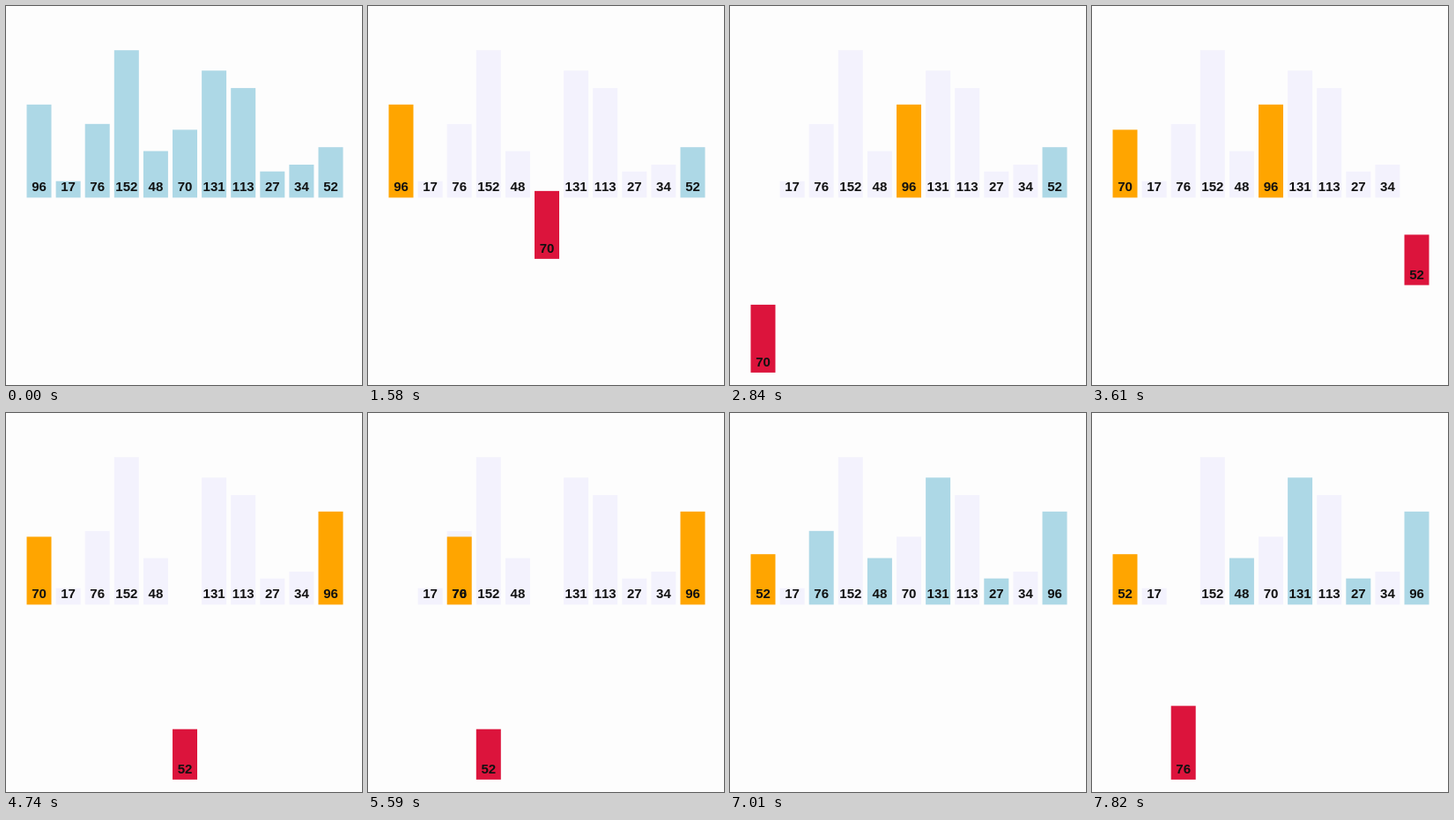
An HTML page with a canvas that plays this animation: 404x430 px, repeating every 8 s.

```html
<!DOCTYPE html>
<html lang="en">
<head>
<meta charset="utf-8">
<title>Shell sort</title>
<style>
  html, body { margin: 0; width: 100%; height: 100%; overflow: hidden; background: #fdfdfd; }
  canvas { display: block; width: 404px; height: 430px; }
</style>
</head>
<body>
<canvas id="stage" width="404" height="430"></canvas>
<script>
const ctx = document.getElementById('stage').getContext('2d');
const LOOP = 8000, TICK = 40, MOVE = 200;
const BASE = 217.4, DROP = 198.5, LEFT = 23.5, PITCH = 33.1, WIDTH = 28;
const BLUE = '#add8e6', PALE = '#f3f2fd', ORANGE = '#ffa500', RED = '#dc143c', COMPARE = '#52bc69';
const values = [96, 17, 76, 152, 48, 70, 131, 113, 27, 34, 52];

const paint = (color, ...list) => list.map(value => ({ value, color }));
const lift = value => ({ value, color: RED, drop: 1 });
const settle = value => ({ value, color: ORANGE, drop: 0 });
const shift = (value, slot) => ({ value, color: ORANGE, slot });
const carry = (value, slot) => ({ value, slot });

// Each step: start time, changes, and the head start of its motion in ms.
const steps = [
  [530, paint(PALE, 17, 76, 152, 48, 131, 113, 27, 34)],
  [1050, paint(ORANGE, 96)],
  [1540, [lift(70)]],
  [2030, paint(COMPARE, 96)],
  [2550, [shift(96, 5), carry(70, 0)], 40],
  [3040, [settle(70)], 40],
  [3530, [lift(52)], 20],
  [4030, paint(COMPARE, 96)],
  [4540, [shift(96, 10), carry(52, 5)]],
  [5030, paint(COMPARE, 70)],
  [5550, [shift(70, 5), carry(52, 0)], 40],
  [6040, [settle(52)], 40],
  [6490, [...paint(BLUE, 52, 76, 48, 131, 27, 96), ...paint(PALE, 70)]],
  [7010, paint(ORANGE, 52)],
  [7540, [lift(76)]]
];

function barsAt(time) {
  const bars = values.map((value, slot) => ({ value, slot, drop: 0, color: BLUE }));
  for (const [start, changes, lead = 30] of steps) {
    if (time < start) break;
    const elapsed = Math.floor((time - start) / TICK) * TICK + lead;
    const progress = Math.min(1, elapsed / MOVE);
    for (const change of changes) {
      const bar = bars.find(b => b.value === change.value);
      if (change.color) bar.color = change.color;
      for (const key of ['slot', 'drop']) {
        if (key in change) bar[key] += (change[key] - bar[key]) * progress;
      }
    }
  }
  return bars;
}

function draw(time) {
  ctx.fillStyle = '#fdfdfd';
  ctx.fillRect(0, 0, 404, 430);
  const bars = barsAt(time);
  for (const { value, slot, drop, color } of bars) {
    const height = value * 1.1;
    ctx.fillStyle = color;
    ctx.fillRect(LEFT + slot * PITCH, BASE + drop * DROP - height, WIDTH, height);
  }
  ctx.fillStyle = '#111';
  ctx.font = 'bold 15px "Liberation Sans", Arial, sans-serif';
  ctx.fontKerning = 'none';
  ctx.textAlign = 'center';
  for (const { value, slot, drop } of bars) {
    ctx.fillText(value, LEFT + slot * PITCH + WIDTH / 2, BASE - 7 + drop * DROP);
  }
}

function frame() {
  draw(performance.now() % LOOP);
  requestAnimationFrame(frame);
}
frame();
</script>
</body>
</html>
```
